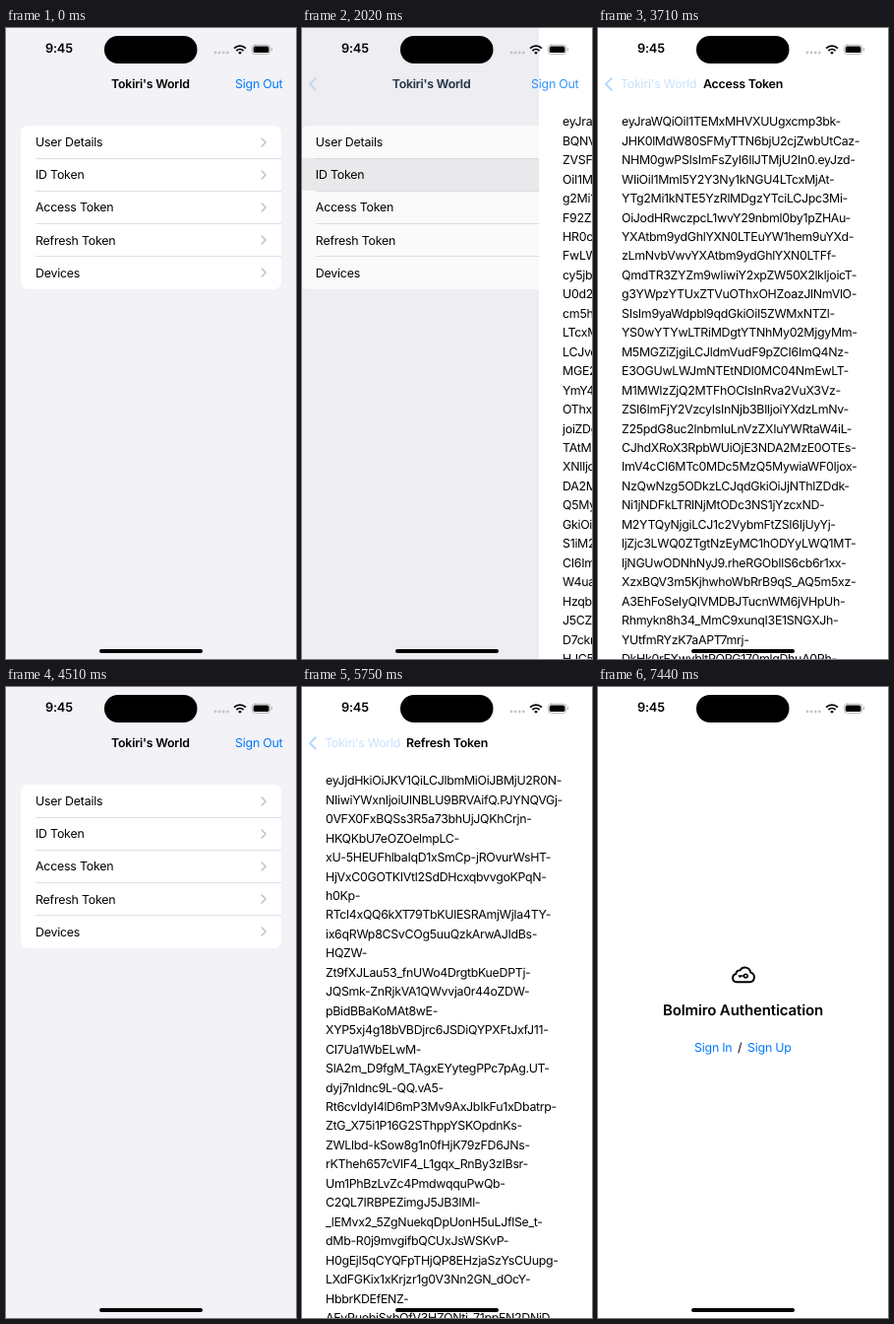
Animation of 295 by 640 pixels, one loop 8.13 s. Source, as an HTML page:

```html
<!DOCTYPE html>
<html lang="en">
<head>
<meta charset="utf-8">
<title>Token viewer</title>
<style>
html, body { margin: 0; width: 100%; height: 100%; overflow: hidden; background: #fff; }
#stage {
  position: relative; width: 295px; height: 640px; overflow: hidden; background: #fff; color: #000;
  font: 400 12.4px/16px Inter, "Open Sans", sans-serif; letter-spacing: -.22px;
  text-rendering: geometricPrecision; white-space: pre;
}
.layer { position: absolute; inset: 0; }
.at { position: absolute; }
.bold { font-weight: 600; }
.blue { color: #007aff; }
svg { position: absolute; left: 0; top: 0; fill: none; stroke-linecap: round; stroke-linejoin: round; }
#home { background: #f2f2f7; }
#card { position: absolute; left: 15px; top: 99px; width: 265px; height: 166px; border-radius: 7.5px; background: #fff; overflow: hidden; }
.row { position: relative; height: 33.2px; line-height: 33.2px; padding-left: 15px; }
.row + .row::before { content: ""; position: absolute; left: 15px; right: 0; top: -.4px; height: .8px; background: #e0e0e3; }
.row i { position: absolute; inset: 0; background: #d1d1d6; opacity: 0; }
.row b { position: relative; font-weight: 400; }
.row svg { left: 244px; top: 11.6px; }
#shade { background: #000; }
#page { background: #fff; }
#token { position: absolute; left: 24px; top: 85.3px; line-height: 19.45px; letter-spacing: -.32px; }
.nav { top: 49px; }
.center { left: 0; width: 295px; text-align: center; }
#auth { background: #fff; }
#product { top: 320px; font-size: 15px; letter-spacing: -.12px; }
</style>
</head>
<body>
<div id="stage">
  <div id="home" class="layer"><div id="card"></div></div>
  <div id="shade" class="layer"></div>
  <div id="page" class="layer"><div id="token"></div></div>

  <div id="title" class="at nav center bold"></div>
  <div id="heading" class="at nav bold">Tokiri's World</div>
  <div id="back" class="at nav blue">Tokiri's World</div>
  <svg id="arrow" width="20" height="70"><path d="M13.8 51.2 8 57l5.8 5.8" stroke="#007aff" stroke-width="1.8"/></svg>
  <div id="signout" class="at nav blue" style="left:233px">Sign Out</div>

  <div id="auth" class="layer">
    <svg width="295" height="310" stroke="#000">
      <path stroke-width="1.9" d="M141 299.3a4.2 4.2 0 0 1-.6-8.3a3.6 3.6 0 0 1 4-3.6a5.9 5.9 0 0 1 10.9 2.3a4.9 4.9 0 0 1-.8 9.6z"/>
      <path stroke-width="1.5" d="M143.2 293h5M144.6 293v1.2"/>
      <circle cx="150.3" cy="293" r="1.8" stroke-width="1.6"/>
    </svg>
    <div id="product" class="at center bold">Bolmiro Authentication</div>
    <div class="at blue" style="left:98px;top:358px">Sign In</div>
    <div class="at" style="left:142px;top:358px">/</div>
    <div class="at blue" style="left:152px;top:358px">Sign Up</div>
  </div>

  <div class="at bold" style="left:40px;top:14px;font-size:12.8px">9:45</div>
  <svg width="295" height="640">
    <rect x="100" y="8" width="94.5" height="28" rx="14" fill="#000"/>
    <g fill="#c5c5c8">
      <circle cx="213" cy="25" r="1.4"/><circle cx="217.1" cy="25" r="1.4"/>
      <circle cx="221.2" cy="25" r="1.4"/><circle cx="225.3" cy="25" r="1.4"/>
    </g>
    <g stroke="#000" stroke-width="1.8" stroke-linecap="butt">
      <path d="M232.1 20.6a8.5 8.5 0 0 1 11.8 0M234.4 23.1a5.2 5.2 0 0 1 7.2 0"/>
      <path d="M236.1 24.9a2.8 2.8 0 0 1 3.8 0L238 26.8z" fill="#000" stroke="none"/>
    </g>
    <rect x="250.4" y="17.2" width="18.4" height="9.2" rx="3" stroke="#a5a5a8" stroke-width=".8"/>
    <rect x="251.7" y="18.5" width="15.8" height="6.6" rx="1.9" fill="#000"/>
    <path d="M270 20.3a1.6 1.6 0 0 1 0 3z" fill="#a5a5a8"/>
    <rect x="95" y="630" width="105" height="4" rx="2" fill="#000"/>
  </svg>
</div>

<script>
const LOOP = 8130, WIDTH = 295, SPRING = 17.3, TAP_DELAY = 40;

const idToken = `eyJraWQiOiJNXC81czltbTFZZG9oTGNuVn-
BQNVwvVGRhMjNNdTdlajVJUUhGTFpDVj-
ZVSFE9IiwiYWxnIjoiUlMyNTYifQ.eyJzdWIi-
OiI1MmI5Y2Y3Ny1kNGU4LTcxMjAtYT-
g2Mi1kNTE5YzRlMDgzYTciLCJlbWFpb-
F92ZXJpZmllZCI6dHJ1ZSwiaXNzIjoia-
HR0cHM6XC9cL2NvZ25pdG8taWRwLm-
FwLW5vcnRoZWFzdC0xLmFtYXpvbmF3-
cy5jb21cL2FwLW5vcnRoZWFzdC0xX0Jn-
U0d2WGZvcCIsImNvZ25pdG86dXNl-
cm5hbWUiOiI1MmI5Y2Y3Ny1kNGU4-
LTcxMjAtYTg2Mi1kNTE5YzRlMDgzYTci-
LCJvcmlnaW5fanRpIjoiOWVjMTU2ZWEt-
MGE2MC00YjA4LWEzYTMtNjI4MjJjOTBm-
YmY4IiwiYXVkIjoicTg3YWpzYTUxZTVu-
OThxOHZoazJlNmVlOSIsImV2ZW50X2lkI-
joiZDg3MTc4ZTAtYmY1MS00MjQwLTg2Y-
TAtMzUxYjNmNDYxMWE4IiwidG9rZW5fd-
XNlIjoiaWQiLCJhdXRoX3RpbWUiOjE3N-
DA2MzE0OTEsImV4cCI6MTc0MDc5Mz-
Q5MywiaWF0IjoxNzQwNzg5ODkzLCJqd-
GkiOiI4MzdjMjlkNS1lNjY1LTQ5MjctOThhM-
S1iM2FmOGM2YmE0ZjAiLCJlbWFpb-
CI6Im5vb25lQGV4YW1wbGUtc2l0ZXN0-
W4uaW52YWxpZCJ9.TFvmiAjuo-
Hzqbqu1B69Z6MAHyqyfNQaZJnQbp-
J5CZfkiggQ8IaDlQdAfwyjG3QWjLCs-
D7cknbSgDMqrFqaxUerq0_XhE-
HJC5c7andaECe66ave.IpXIU4CHQ7vX`;

const accessToken = `eyJraWQiOiI1TEMxMHVXUUgxcmp3bk-
JHK0lMdW80SFMyTTN6bjU2cjZwbUtCaz-
NHM0gwPSIsImFsZyI6IlJTMjU2In0.eyJzd-
WIiOiI1MmI5Y2Y3Ny1kNGU4LTcxMjAt-
YTg2Mi1kNTE5YzRlMDgzYTciLCJpc3Mi-
OiJodHRwczpcL1wvY29nbml0by1pZHAu-
YXAtbm9ydGhlYXN0LTEuYW1hem9uYXd-
zLmNvbVwvYXAtbm9ydGhlYXN0LTFf-
QmdTR3ZYZm9wIiwiY2xpZW50X2lkIjoicT-
g3YWpzYTUxZTVuOThxOHZoazJlNmVlO-
SIsIm9yaWdpbl9qdGkiOiI5ZWMxNTZl-
YS0wYTYwLTRiMDgtYTNhMy02MjgyMm-
M5MGZiZjgiLCJldmVudF9pZCI6ImQ4Nz-
E3OGUwLWJmNTEtNDI0MC04NmEwLT-
M1MWIzZjQ2MTFhOCIsInRva2VuX3Vz-
ZSI6ImFjY2VzcyIsInNjb3BlIjoiYXdzLmNv-
Z25pdG8uc2lnbmluLnVzZXIuYWRtaW4iL-
CJhdXRoX3RpbWUiOjE3NDA2MzE0OTEs-
ImV4cCI6MTc0MDc5MzQ5MywiaWF0Ijox-
NzQwNzg5ODkzLCJqdGkiOiJjNThlZDdk-
Ni1jNDFkLTRlNjMtODc3NS1jYzcxND-
M2YTQyNjgiLCJ1c2VybmFtZSI6IjUyYj-
ljZjc3LWQ0ZTgtNzEyMC1hODYyLWQ1MT-
ljNGUwODNhNyJ9.rheRGObIlS6cb6r1xx-
XzxBQV3m5KjhwhoWbRrB9qS_AQ5m5xz-
A3EhFoSeIyQIVMDBJTucnWM6jVHpUh-
Rhmykn8h34_MmC9xunqI3E1SNGXJh-
YUtfmRYzK7aAPT7mrj-
DkHk0rFXwybltPQPG170mlgDhuA0Ph-`;

const refreshToken = `eyJjdHkiOiJKV1QiLCJlbmMiOiJBMjU2R0N-
NIiwiYWxnIjoiUlNBLU9BRVAifQ.PJYNQVGj-
0VFX0FxBQSs3R5a73bhUjJQKhCrjn-
HKQKbU7eOZOelmpLC-
xU-5HEUFhlbaIqD1xSmCp-jROvurWsHT-
HjVxC0GOTKIVtl2SdDHcxqbvvgoKPqN-
h0Kp-
RTcl4xQQ6kXT79TbKUlESRAmjWjIa4TY-
ix6qRWp8CSvCOg5uuQzkArwAJIdBs-
HQZW-
Zt9fXJLau53_fnUWo4DrgtbKueDPTj-
JQSmk-ZnRjkVA1QWvvja0r44oZDW-
pBidBBaKoMAt8wE-
XYP5xj4g18bVBDjrc6JSDiQYPXFtJxfJ11-
CI7Ua1WbELwM-
SlA2m_D9fgM_TAgxEYytegPPc7pAg.UT-
dyj7nIdnc9L-QQ.vA5-
Rt6cvldyI4lD6mP3Mv9AxJbIkFu1xDbatrp-
ZtG_X75i1P16G2SThppYSKOpdnKs-
ZWLlbd-kSow8g1n0fHjK79zFD6JNs-
rKTheh657cVlF4_L1gqx_RnBy3zIBsr-
Um1PhBzLvZc4PmdwqquPwQb-
C2QL7IRBPEZimgJ5JB3IMl-
_lEMvx2_5ZgNuekqDpUonH5uLJflSe_t-
dMb-R0j9mvgifbQCUxJsWSKvP-
H0gEjI5qCYQFpTHjQP8EHzjaSzYsCUupg-
LXdFGKix1xKrjzr1g0V3Nn2GN_dOcY-
HbbrKDEfENZ-
AEvPuobjSxbQfV3HZQNti_71ppFN2DNjD`;

const rows = ["User Details", "ID Token", "Access Token", "Refresh Token", "Devices"];
const visits = [
  { push: 610, pop: 1800, end: 2560, row: 1, token: idToken },
  { push: 2850, pop: 3710, end: 4510, row: 2, token: accessToken },
  { push: 4740, pop: 5750, end: 6460, row: 3, token: refreshToken },
];

// The picture is refreshed in short bursts, plus one settling refresh after each.
const bursts = [[610, 1040, 5], [1800, 2350, 6], [2850, 3300, 5], [3710, 4260, 6],
                [4740, 5280, 6], [5750, 6280, 6], [6610, 7250, 7]];
const ticks = [0, 1310, 2560, 3570, 4510, 5520, 6460, 7440];
for (const [from, to, count] of bursts)
  for (let i = 0; i < count; i++)
    ticks.push(Math.round((from + (to - from) * i / (count - 1)) / 10) * 10);
ticks.sort((a, b) => a - b);

const el = Object.fromEntries([...document.querySelectorAll("[id]")].map(e => [e.id, e]));
el.card.innerHTML = rows.map(name =>
  `<div class="row"><i></i><b>${name}</b><svg width="8" height="10"><path d="M1.2 1l3.9 4-3.9 4" stroke="#c2c2c6" stroke-width="1.5"/></svg></div>`).join("");
const marks = el.card.querySelectorAll("i");

const clamp = v => Math.min(1, Math.max(0, v));
const shift = (node, x) => node.style.transform = `translateX(${x}px)`;
const fade = (node, alpha) => node.style.opacity = alpha;
// Share of the way left for a critically damped spring.
const remaining = ms => {
  const x = SPRING * Math.max(0, ms) / 1000;
  return (1 + x) * Math.exp(-x);
};

let shown = null;
function draw(t) {
  const visit = visits.find(v => t >= v.push && t < v.end);
  const popping = visit && t >= visit.pop;
  const open = !visit ? 0 : popping ? remaining(t - visit.pop - TAP_DELAY) : 1 - remaining(t - visit.push);
  const offset = WIDTH * (1 - open);

  if (visit && visit !== shown) {
    el.token.textContent = visit.token;
    el.title.textContent = rows[visit.row];
    shown = visit;
  }
  marks.forEach((mark, i) =>
    fade(mark, visit && i === visit.row ? (popping ? clamp(open * 2) : 1) : 0));

  shift(el.home, -.3 * WIDTH * open);
  fade(el.shade, .1 * open);
  shift(el.page, offset);
  shift(el.title, .6 * offset);
  fade(el.title, clamp((open - .2) / .8));

  const labelX = 107 - 84 * open;
  const pressed = popping && t < visit.pop + TAP_DELAY;
  shift(el.heading, labelX);
  shift(el.back, labelX);
  fade(el.heading, 1 - open);
  fade(el.back, pressed ? .22 : open);
  fade(el.arrow, pressed ? .3 : open);
  fade(el.signout, t >= 6610 ? .25 : 1 - open);

  const k = clamp((t - 6700) / 550);
  fade(el.auth, k * k * (3 - 2 * k));
}

const start = performance.now();
function frame() {
  const now = (performance.now() - start) % LOOP;
  draw(ticks.findLast(tick => tick <= now));
  requestAnimationFrame(frame);
}
frame();
</script>
</body>
</html>
```
